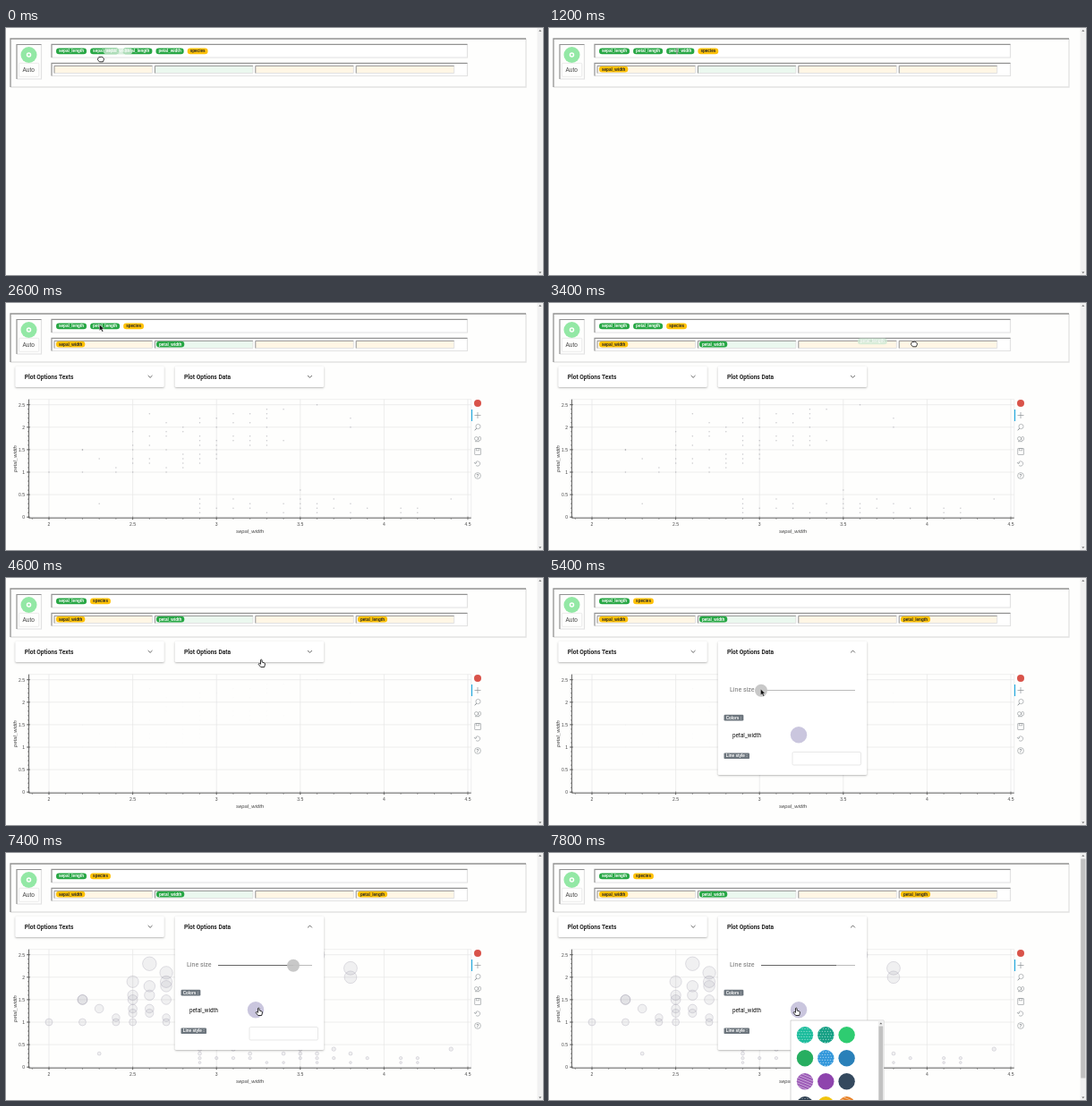
These frames come from a looping animation (600x276 px, 8 s). An HTML page with a canvas:

```html
<!DOCTYPE html>
<html lang="en">
<head>
<meta charset="utf-8">
<title>Chart builder</title>
<style>
html, body { margin: 0; width: 100%; height: 100%; overflow: hidden; background: #fefefd; }
canvas { display: block; width: 600px; height: 276px; }
</style>
</head>
<body>
<canvas id="stage"></canvas>
<script>
const LOOP = 8000, STEP = 200;
const GREEN = '#28a745', YELLOW = '#ffc107', PAGE = '#fefefd';
const SANS = '"Liberation Sans", Arial, sans-serif', ROBOTO = 'Roboto, sans-serif';
const canvas = document.getElementById('stage');
const c = canvas.getContext('2d');
const ratio = window.devicePixelRatio || 1;
canvas.width = 600 * ratio;
canvas.height = 276 * ratio;

const clamp = (v, lo, hi) => Math.max(lo, Math.min(hi, v));

// Resting points of the pointer: time, x, y.
const stops = [
  [-200, 125, 26], [0, 106, 35], [600, 73, 46], [1200, 143, 26], [2200, 182, 46], [2600, 106, 26],
  [3400, 408, 46], [4600, 285, 94], [4900, 283, 85], [5400, 238, 126], [6200, 314, 128],
  [6600, 322, 128], [7400, 282, 176], [7800, 276, 176]
];
function pointer(t) {
  const i = clamp(stops.findIndex(s => s[0] >= t), 1, stops.length - 1);
  const [t0, x0, y0] = stops[i - 1], [t1, x1, y1] = stops[i];
  const p = clamp((t - t0) / (t1 - t0), 0, 1), e = p * p * (3 - 2 * p);
  return [x0 + (x1 - x0) * e, y0 + (y1 - y0) * e];
}

// Sample points as [sepal width, petal width] in tenths: two clouds and their outliers.
function makeSamples() {
  const points = [[20, 10], [22, 10], [22, 15], [22, 15], [23, 13], [24, 10], [24, 11],
    [26, 23], [38, 20], [38, 22], [36, 25], [23, 3], [44, 4], [35, 6]];
  let seed = 7;
  const random = () => (seed = seed * 16807 % 2147483647) / 2147483647;
  for (let w = 25; w <= 34; w++) {
    const low = 10 + Math.max(0, w - 27) * .9, high = 20 + (w - 25) * .5;
    for (let p = Math.ceil(low); p <= high; p++)
      if (random() < (w % 2 ? .62 : .5)) points.push([w, p]);
  }
  for (let w = 29; w <= 42; w++)
    for (let p = 1; p <= 4; p++)
      if (random() < (p === 2 ? .9 : .35)) points.push([w, p]);
  return points;
}
const samples = makeSamples();

function rect(x, y, w, h, fill, stroke, r = 0) {
  c.beginPath();
  c.roundRect(x, y, w, h, r);
  if (fill) { c.fillStyle = fill; c.fill(); }
  if (stroke) { c.strokeStyle = stroke; c.lineWidth = .6; c.stroke(); }
}
function disc(x, y, r, fill, stroke, width = .6) {
  c.beginPath();
  c.arc(x, y, r, 0, 7);
  if (fill) { c.fillStyle = fill; c.fill(); }
  if (stroke) { c.strokeStyle = stroke; c.lineWidth = width; c.stroke(); }
}
function line(points, color, width = .7) {
  c.beginPath();
  points.forEach(([x, y]) => c.lineTo(x, y));
  c.strokeStyle = color;
  c.lineWidth = width;
  c.stroke();
}
function text(s, x, y, font, color, align = 'left') {
  c.font = font;
  c.fillStyle = color;
  c.textAlign = align;
  c.fillText(s, x, y);
}
function inset(x, y, x2, y2, fill, width = 1.2, r = 0) {
  rect(x, y, x2 - x, y2 - y, fill, null, r);
  line([[x, y2], [x2, y2], [x2, y]], '#e2e2e2', width);
  line([[x, y2], [x, y], [x2, y]], '#929292', width);
}

const CHIP_FONT = 'bold 4.6px ' + SANS;
function chip(name, x, y, color) {
  c.font = CHIP_FONT;
  const w = c.measureText(name).width + 6;
  rect(x, y - 3.3, w, 6.7, color, null, 3.3);
  text(name, x + 3, y + 1.4, CHIP_FONT, color === YELLOW ? '#212529' : '#fff');
  return w;
}

// Each drag takes a chip from the list to a shelf.
const drags = [
  { name: 'sepal_width', start: 0, drop: 600, x: 56, color: YELLOW },
  { name: 'petal_width', start: 1400, drop: 2200, x: 168, color: GREEN },
  { name: 'petal_length', start: 2800, drop: 3600, x: 393, color: YELLOW }
];
const activeDrag = t => drags.find(d => t >= d.start && t < d.drop);

function shelves(t) {
  inset(5, 12, 581, 66, null, 1.3);
  inset(12, 18.5, 39.5, 57);
  disc(25.5, 30, 9, '#93e8a5');
  disc(25.5, 30, 2, null, '#fff', 1.5);
  rect(14.3, 39.3, 22.5, 15, PAGE, '#dedede', 1);
  text('Auto', 25.2, 49, '6.5px ' + SANS, '#444', 'center');

  inset(51, 18.3, 515.5, 33, '#fff');
  inset(51, 39.3, 515.5, 53.5, '#fff');
  for (let i = 0; i < 4; i++) {
    const x = 54 + i * 112.4;
    inset(x, 42.3, x + 109.5, 50.5, i === 1 ? '#ebf8ef' : '#fff6e5', 1, 1.5);
  }

  const placed = drags.filter(d => t >= d.drop);
  let x = 56;
  for (const name of ['sepal_length', 'sepal_width', 'petal_length', 'petal_width', 'species'])
    if (!placed.some(d => d.name === name))
      x += chip(name, x, 25.9, name === 'species' ? YELLOW : GREEN) + 4;
  placed.forEach(d => chip(d.name, d.x, 46.1, d.color));
}

const px = v => 48 + (v - 2) * 187.2;
const py = v => 239.2 - v * 50.2;

function plot(t, size) {
  const ink = '#444', tickFont = '5px ' + SANS;
  const left = px(1.88), right = px(4.52), bottom = py(-.02), top = py(2.62);
  for (let i = 0; i <= 5; i++) {
    const v = i / 2, x = px(2 + v), y = py(v);
    line([[x, top], [x, bottom]], '#e5e5e5');
    line([[left, y], [right, y]], '#e5e5e5');
    line([[x, bottom - 1.5], [x, bottom + 2]], ink);
    line([[left - 2.5, y], [left + 1.5, y]], ink);
    text(2 + v, x, 248.7, tickFont, '#444', 'center');
    text(v, 21, y + 1.8, tickFont, '#444', 'right');
  }
  for (let v = 0; v <= 2.6; v += .1) {
    const x = px(1.9 + v), y = py(v);
    line([[x, bottom], [x, bottom + 1.6]], ink, .6);
    line([[left - 1.6, y], [left, y]], ink, .6);
  }
  rect(left, top, right - left, bottom - top, null, '#e5e5e5');
  line([[left, top], [left, bottom], [right, bottom]], ink, .8);

  const titleFont = 'italic 5.9px ' + SANS;
  text('sepal_width', 272.5, 257, titleFont, '#444', 'center');
  c.save();
  c.translate(12, 174);
  c.rotate(-Math.PI / 2);
  text('petal_width', 0, 0, titleFont, '#444', 'center');
  c.restore();

  const sized = t >= 3800;
  for (const [w, p] of samples) {
    const x = px(w / 10), y = py(p / 10);
    if (!sized) disc(x, y, .75, 'rgba(120,120,130,.4)');
    else disc(x, y, (.9 + .24 * p) * size, 'rgba(130,125,150,.11)',
      `rgba(115,112,135,${Math.min(.34, .06 + size)})`, Math.min(.6, size * 2));
  }
  toolbar();
}

function toolbar() {
  const gray = '#8d9296', x = 527;
  disc(x, 112, 4, '#d9534a');
  line([[520.5, 119], [520.5, 132]], '#26aae1', 1.2);
  line([[x - 3.5, 125.5], [x + 3.5, 125.5]], gray);
  line([[x, 122], [x, 129]], gray);
  disc(x + .5, 138, 2.6, null, gray);
  line([[x - 1.2, 140], [x - 3.3, 142.3]], gray, 1);
  disc(x - 1.5, 151.5, 2, null, gray);
  rect(x + 1, 149.5, 2.5, 4, null, gray, 1);
  line([[x - 3, 154.7], [x + 2, 154.7]], gray);
  rect(x - 3.3, 162.5, 6.8, 7, null, gray, .5);
  rect(x - 1.7, 162.5, 3.5, 2.3, null, gray);
  c.beginPath();
  c.arc(x, 179.5, 2.7, -2.8, 2.4);
  c.stroke();
  line([[x - 4, 178], [x - 2.5, 179.8], [x - 1, 178]], gray);
  disc(x, 193, 3.4, null, gray);
  text('?', x, 195, 'bold 5.4px ' + SANS, gray, 'center');
}

function panel(x, title, open) {
  c.save();
  c.shadowColor = 'rgba(0,0,0,.28)';
  c.shadowBlur = 2.2 * ratio;
  c.shadowOffsetY = .9 * ratio;
  rect(x, 70.5, 166.5, 23.5 + 126 * open, '#fff', null, 1.5);
  c.restore();
  text(title, x + 10.4, 84.8, 'bold 6.6px ' + ROBOTO, '#222');
  const d = 1.2 * (1 - 2 * open), cx = x + 150.8;
  line([[cx - 2.4, 82.2 - d], [cx, 82.2 + d], [cx + 2.4, 82.2 - d]], '#555', .9);
}

function badge(label, y) {
  c.font = CHIP_FONT;
  rect(195.5, y - 3.3, c.measureText(label).width + 4.5, 6.7, '#6c757d', null, 1.2);
  text(label, 197.7, y + 1.5, CHIP_FONT, '#fff');
}

function dataPanel(open, value, picking) {
  panel(188.7, 'Plot Options Data', open);
  c.save();
  c.beginPath();
  c.rect(188, 94, 168, 126 * open);
  c.clip();
  text('Line size', 202, 126.8, '7.1px ' + ROBOTO, '#757575');
  const knob = 237 + 105 * value;
  line([[237, 125.5], [342, 125.5]], '#aaa', .8);
  line([[237, 125.5], [knob, 125.5]], '#666', 1);
  if (!picking) disc(knob, 125.7, 7, 'rgba(195,195,195,.92)');
  badge('Colors :', 156);
  text('petal_width', 205, 178.4, '6.3px ' + ROBOTO, '#111');
  disc(279, 175.3, 9.2, '#cac6de');
  badge('Line style :', 198.7);
  rect(272, 194.5, 76.5, 14.5, '#fff', '#d8d8d8', 1.5);
  c.restore();
}

function swatch(x, y, color, pattern) {
  disc(x, y, 9.2, color);
  if (!pattern) return;
  c.save();
  c.clip();
  for (let i = -10; i <= 10; i += 3) {
    if (pattern === 'stripes') line([[x - 10, y + i - 4], [x + 10, y + i + 4]], 'rgba(255,255,255,.65)');
    else for (let j = -10; j <= 10; j += 3) disc(x + i + (j & 1), y + j, .55, 'rgba(255,255,255,.8)');
  }
  c.restore();
}

const swatches = [
  ['#1abc9c', 'dots'], ['#16a085', 'dots'], ['#2ecc71'], ['#27ae60'], ['#3498db', 'dots'], ['#2980b9'],
  ['#9b59b6', 'stripes'], ['#8e44ad'], ['#34495e'], ['#2c3e50', 'dots'], ['#f1c40f'], ['#e67e22', 'stripes']
];
function picker() {
  rect(270, 187, 104, 100, '#fff', '#bbb');
  swatches.forEach(([color, pattern], i) =>
    swatch(286 + i % 3 * 23.3, 203.3 + Math.floor(i / 3) * 26, color, pattern));
  rect(367.8, 187.3, 6, 90, '#f1f1f1');
  rect(368.4, 193.5, 4.8, 83, '#c1c1c1');
  arrowHead(370.8, 190.5, -1);
}

function arrowHead(x, y, dir) {
  c.beginPath();
  c.moveTo(x - 1.5, y - dir * .8);
  c.lineTo(x + 1.5, y - dir * .8);
  c.lineTo(x, y + dir * .9);
  c.fillStyle = '#666';
  c.fill();
}

function scrollbar(active) {
  rect(593.5, 0, 6.5, 276, '#f1f1f1');
  if (active) rect(594.2, 6.5, 5.2, 245, '#c1c1c1');
  arrowHead(596.8, 3, -1);
  arrowHead(596.8, 273.3, 1);
}

const cursors = {
  fist: 'M-3 -1.5 Q-2.5 -3 -1 -2.5 Q1 -3.3 2.3 -2 Q3.7 -1.5 3.3 .5 L2.3 2.8 H-1.6 L-3.5 .5 Z',
  hand: 'M-1 -3.5 Q0 -4.3 .6 -3.3 V-1 L3.4 0 Q4.3 .5 3.8 2 L3.2 4.5 H-.8 L-3.3 1.5 Q-3.3 .3 -2 .7 L-1 1.3 Z',
  arrow: 'M-1.6 -2 V5 L.1 3.5 L1.5 6.2 L2.7 5.6 L1.4 3 H3.5 Z',
  beam: 'M-.5 -3.5 H.5 V3 H-.5 Z'
};
function cursorKind(t) {
  if (activeDrag(t)) return 'fist';
  if (t >= 1000 && t < 1400) return 'beam';
  return (t >= 4400 && t < 5200) || t >= 7200 ? 'hand' : 'arrow';
}
function cursor(t) {
  const kind = cursorKind(t), shape = new Path2D(cursors[kind]);
  const light = kind === 'fist' || kind === 'hand';
  c.save();
  c.translate(...pointer(t));
  if (kind === 'hand') c.translate(.5, 1);
  c.fillStyle = light ? '#fff' : '#111';
  c.strokeStyle = light ? '#111' : '#fff';
  c.lineWidth = light ? .85 : .4;
  c.fill(shape);
  c.stroke(shape);
  c.restore();
}

function ghost(t) {
  const drag = activeDrag(t);
  if (!drag) return;
  const [x, y] = pointer(t - STEP);
  c.save();
  c.globalAlpha = .8;
  chip(drag.name, x - 16, y, '#cfead5');
  c.restore();
}

function draw(t) {
  const open = clamp((t - 4700) / 300, 0, 1), picking = t >= 7600;
  // The slider knob trails the pointer by one step.
  const value = clamp((pointer(clamp(t - STEP, 5400, 6600))[0] - 238) / 105, 0, 1);
  c.setTransform(ratio, 0, 0, ratio, 0, 0);
  c.fillStyle = PAGE;
  c.fillRect(0, 0, 600, 276);
  shelves(t);
  if (t >= 2600) {
    plot(t, .06 + 1.43 * value);
    panel(10.3, 'Plot Options Texts', 0);
    dataPanel(open, value, picking);
    if (picking) picker();
  }
  scrollbar(picking);
  ghost(t);
  cursor(t);
}

function frame() {
  draw(Math.floor(performance.now() % LOOP / STEP) * STEP);
  requestAnimationFrame(frame);
}
frame();
</script>
</body>
</html>
```
